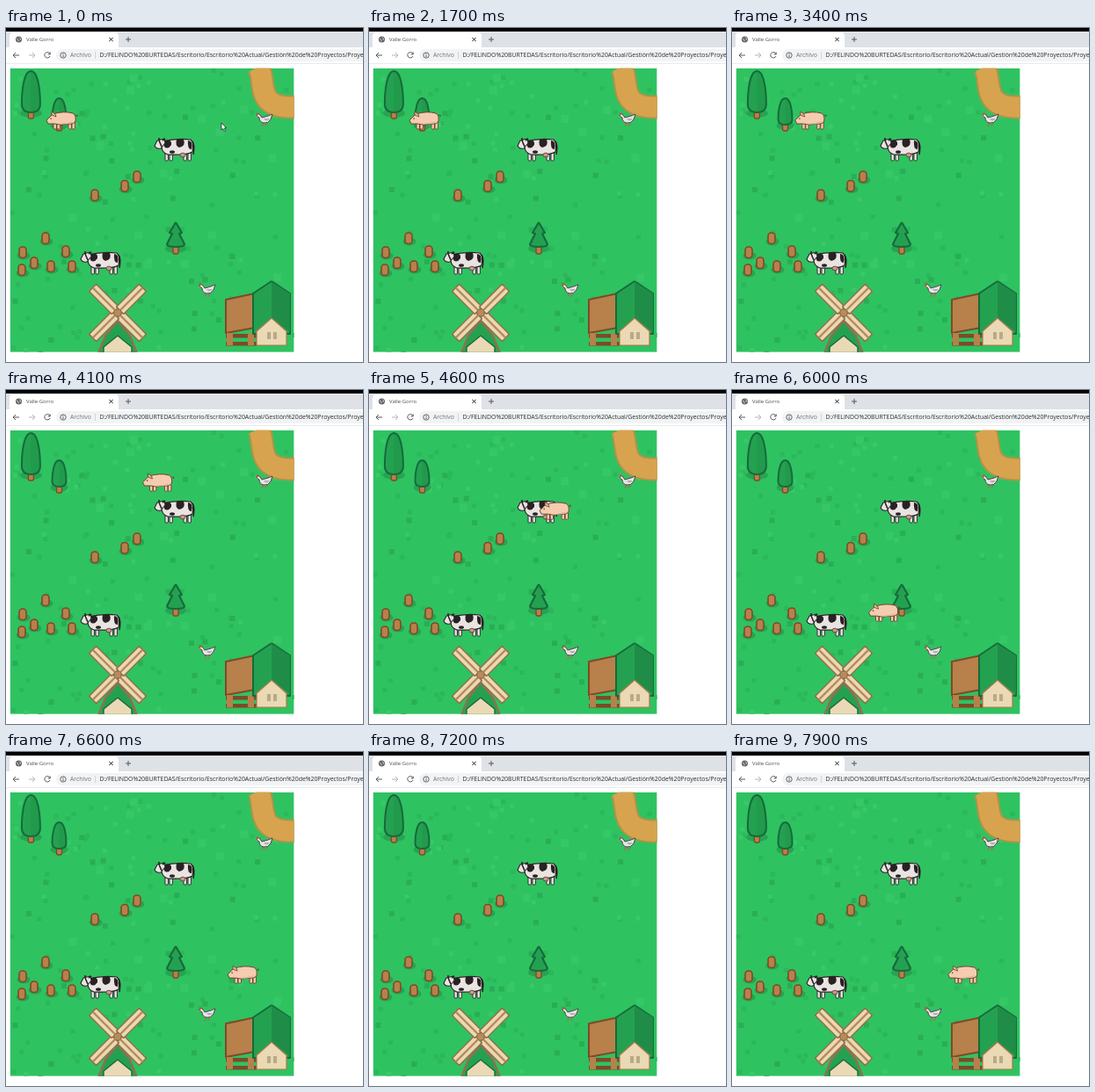
Animation of 406 by 380 pixels, one loop 8000 ms. Source, as an HTML page with a canvas:

```html
<!DOCTYPE html>
<html lang="es">
<head>
<meta charset="utf-8">
<title>Valle Gorro</title>
<style>
html, body { margin: 0; width: 100%; height: 100%; overflow: hidden; background: #fff; }
canvas { display: block; width: 406px; height: 380px; }
</style>
</head>
<body>
<canvas id="stage" width="406" height="380"></canvas>
<script>
const ctx = document.getElementById('stage').getContext('2d');
const LOOP = 8000, TICK = 100, STEP = 6.44;
const MAP = { x: 4.6, y: 45.8, size: 323 };
const LEAF = '#24a150', LEAF_DARK = '#166b3b', SHADE = '#27a452';
const WOOD = '#b8804a', WOOD_DARK = '#7d4a28', CREAM = '#ead9b4', INK = '#292124';
const GRAY = '#55595e', PALE = '#b2b5b8';

// Waypoints: time, x, y
const pigRoute = [
  [3200, 64, 105], [4100, 173, 105], [4400, 212, 105], [5100, 212, 208], [5300, 212, 254],
  [5500, 112, 254], [5600, 112, 254], [7100, 350, 254], [7400, 346, 254], [7900, 263, 254]
];
const pointerRoute = [[0, 245, 108], [900, 178, 88], [1700, 148, 78]];

function along(route, t) {
  const next = route.findIndex(p => p[0] >= t);
  if (next < 1) return route.at(next).slice(1);
  const [t0, x0, y0] = route[next - 1], [t1, x1, y1] = route[next];
  const k = (t - t0) / (t1 - t0);
  return [x0 + (x1 - x0) * k, y0 + (y1 - y0) * k];
}

function paint(path, fill, stroke, width = 1) {
  if (fill) { ctx.fillStyle = fill; ctx.fill(path); }
  if (stroke) { ctx.strokeStyle = stroke; ctx.lineWidth = width; ctx.stroke(path); }
}

const shape = (d, ...style) => paint(new Path2D(d), ...style);
const line = (d, color, width) => shape(d, null, color, width);

// Joins the right half of an outline with its mirror image.
function mirrored(d, ...style) {
  const half = new Path2D(d), whole = new Path2D(d);
  whole.addPath(half, new DOMMatrix([-1, 0, 0, 1, 0, 0]));
  paint(whole, ...style);
}

function oval(x, y, rx, ry, ...style) {
  const p = new Path2D();
  p.ellipse(x, y, rx, ry, 0, 0, 7);
  paint(p, ...style);
}

function pill(x, y, w, h, r, ...style) {
  const p = new Path2D();
  p.roundRect(x, y, w, h, r);
  paint(p, ...style);
}

function box(x, y, w, h, color) {
  ctx.fillStyle = color;
  ctx.fillRect(x, y, w, h);
}

function text(s, x, y, size, color) {
  ctx.font = `${size}px "Open Sans", "Noto Sans", sans-serif`;
  ctx.fillStyle = color;
  ctx.fillText(s, x, y);
}

function at(x, y, draw, angle = 0) {
  ctx.save();
  ctx.translate(x, y);
  ctx.rotate(angle);
  draw();
  ctx.restore();
}

function random(seed) {
  return () => (seed = (seed * 16807) % 2147483647) / 2147483647;
}

const arrow = color => line('M4 0H-3M0 -3L-3 0L0 3', color);
const plus = () => line('M-3 0H3M0 -3V3', GRAY);

function browser() {
  box(0, 0, 406, 380, '#fff');
  box(0, 0, 406, 22, '#dee1e6');
  box(0, 0, 406, 4, '#000');
  pill(4, 5, 124, 17, [4, 4, 0, 0], '#fff');
  pill(57, 24, 360, 14, 7, '#f1f3f4');
  box(0, 40, 406, 0.6, '#dcdee1');

  at(14.5, 13, () => {
    oval(0, 0, 3.5, 3.5, '#5f6368');
    line('M-2.5 -1L-0.5 0.5V2.5M0.5 -2.5L2 -1L1.5 1', '#e8eaed', 0.8);
  });
  text('Valle Gorro', 23, 15.2, 6, '#45494d');
  at(119.5, 13, plus, Math.PI / 4);
  at(139, 13, plus);

  at(11, 31, () => arrow(GRAY));
  at(30, 31, () => arrow(PALE), Math.PI);
  at(47, 31, () => line('M3 -1.5A3.2 3.2 0 1 0 3 1M3.2 -3.5V-1H0.8', GRAY));
  at(65, 31, () => {
    oval(0, 0, 3.2, 3.2, null, GRAY, 0.9);
    line('M0 -2V-1M0 -0.3V2', GRAY);
  });
  text('Archivo', 73, 33.4, 6.9, '#707479');
  box(101, 27, 0.7, 8, '#c4c7ca');
  text('D:/FELINDO%20BURTEDAS/Escritorio/Escritorio%20Actual/Gestión%20de%20Proyectos/Proyecto',
    106.5, 33.4, 6.92, '#2b2e31');
}

function grass() {
  const { x, y, size } = MAP, rnd = random(4173);
  box(x, y, size, size, '#2fc261');
  const scatter = (count, side, color) => {
    while (count--) box(x + rnd() * size, y + rnd() * size, side, side, color);
  };
  scatter(80, 5, '#2bb75a');
  scatter(30, 6, '#29ae55');
  scatter(35, 5, '#38c969');
  scatter(14, 9, '#36c867');
}

function road() {
  const d = 'M287 44C297 62 281 92 330 90';
  line(d, '#ad9447', 27);
  line(d, '#d7a34f', 23);
}

function trunk(y) {
  pill(-3, y - 6, 6, 9, 2, WOOD, WOOD_DARK, 1.4);
}

function tree(r, h) {
  oval(0, h + 1, r + 2, 5, SHADE);
  trunk(h + 4);
  const side = `M0 0C${r * 0.8} 0 ${r} ${h * 0.5} ${r} ${h * 0.8}Q${r} ${h} 0 ${h}`;
  mirrored(side, LEAF, LEAF_DARK, 2);
  shape(side, 'rgba(18,115,58,.15)');
}

function pine() {
  oval(0, 31, 12, 5, SHADE);
  trunk(34);
  mirrored('M0 1L7 13L4 14L10 26Q10 29 0 29', LEAF, LEAF_DARK, 2.2);
}

function stump(x, y) {
  oval(x + 1, y + 4, 7.5, 4.5, SHADE);
  pill(x - 4, y - 6, 8, 12.5, 3.5, WOOD, WOOD_DARK, 1.6);
}

function stumps() {
  for (let i = 0; i < 3; i++) stump(149 - 4 * i - 10 * i * i, 169 + 10.5 * i);
  for (const [x, y] of [[45, 239], [68, 254], [19, 255], [32, 267], [51, 271], [75, 271], [18, 275]]) {
    stump(x, y);
  }
}

function sail() {
  pill(3, -6.5, 38, 13, 1, '#8f714f');
  pill(4.5, -5, 35, 10, 1, CREAM);
  box(0, -1.2, 40, 2.4, '#b98b58');
}

function mill() {
  mirrored('M0 9L14 26L22 46H0', LEAF, '#8f714f', 2.4);
  mirrored('M0 26L16 39V46H0', CREAM, LEAF_DARK, 1.4);
  for (let i = 0; i < 4; i++) at(0, 0, sail, Math.PI * (i + 0.5) / 2);
  pill(-4, -4, 8, 8, 3, '#b98b58', '#8f714f');
}

function barn() {
  shape('M-52 21L-19 14V53L-52 59Z', WOOD, WOOD_DARK, 2);
  for (const y of [60, 69]) box(-52, y, 35, 4.5, WOOD_DARK);
  for (const x of [-51, -27]) box(x, 59, 7, 14, WOOD);
  mirrored('M0 0L21 14V60H0', LEAF, LEAF_DARK, 2);
  box(0, 3, 3, 40, '#1f8d47');
  shape('M0 1L21 14V58L0 42Z', '#1f8d47');
  mirrored('M0 42L17 57V73H0', CREAM, '#a9794a', 1.2);
  for (const x of [-5, 2]) box(x, 58, 4, 8, '#b7aa87');
}

function legs(xs, y, len, color, edge) {
  for (const x of xs) pill(x, y, 3.4, len, 1, color, edge, 0.9);
}

// Animals are drawn around their centre, facing left.
function cow() {
  const hide = '#e9e3e2';
  legs([-11, -6, 10, 15], 3, 10, hide, INK);
  line('M20 -9Q23 -5 21 6', INK, 1.5);
  shape('M-14 -9Q2 -13 18 -11Q22 -8 20 3Q14 7 -8 6Q-14 4 -15 -2Z', hide, INK, 1.2);
  shape('M-12 -10Q-3 -12 -4 -5Q-8 1 -12 -3ZM2 -11H10Q13 -4 5 -2Q0 -4 2 -11ZM15 -10Q21 -10 19 0Q14 0 15 -10Z', INK);
  oval(-3, 3, 3, 1.8, INK);
  oval(9, 6.5, 3, 2.4, '#cf9482', INK, 0.6);
  shape('M-12 -12L-20 -10L-23 -4Q-21 0 -16 -1L-11 -7Z', hide, INK, 1.1);
  line('M-18 -10L-15 -3M-18 -10V-13M-14 -10L-11 -12', INK, 1.6);
}

function hen() {
  line('M-1 3V7H-3M3 3V7H1', '#a7703e');
  shape('M-8 -4Q-7 -8 -4 -5L-2 -2L5 -4L10 -6L8 0Q5 5 0 4Q-5 3 -5 -2Z', '#e8e3e5', '#51474b');
  shape('M0 -1L7 -1Q3 4 0 -1Z', '#b5aeb3');
  oval(-6.5, -6.5, 1.6, 1.1, '#d64534');
  shape('M-8 -4L-10 -3H-7Z', '#dd9638');
}

function pig() {
  const skin = '#f5ccaf', edge = '#684331';
  legs([-10, -6, 7, 11], 1, 9, skin, edge);
  shape('M-11 -7Q2 -11 12 -8Q16 -6 15 1Q13 5 6 4Q-2 6 -9 4H-16L-18 0L-14 -4Z', skin, edge);
  shape('M-6 4Q3 4 13 1Q8 6 -6 4Z', '#e4b497');
  shape('M-12 -6V-10L-8 -7L-7 -4Z', '#e9b79a', edge, 0.8);
  box(-13.5, -2.5, 1.2, 1.2, INK);
  line('M15 -5Q18 -8 17 -4', edge);
}

function pointer() {
  shape('M0 0V8L1.8 6.4L3.2 9.4L4.6 8.8L3.3 5.8H5.8Z', '#fff', '#222', 0.8);
}

function scenery() {
  grass();
  road();
  at(28.4, 49, () => tree(10.5, 47));
  at(60.5, 80, () => tree(8, 30));
  at(193, 220, pine);
  stumps();
  at(127, 324, mill);
  at(302, 288, barn);
  at(192, 138, cow);
  at(108, 267, cow);
  at(293, 104, hen);
  at(228, 298, hen);
}

function render(t) {
  browser();
  ctx.save();
  ctx.beginPath();
  ctx.rect(MAP.x, MAP.y, MAP.size, MAP.size);
  ctx.clip();
  scenery();
  const [x, y] = along(pigRoute, t);
  const snap = (v, base) => base + Math.round((v - base) / STEP) * STEP;
  at(snap(x, 64), snap(y, 105), pig);
  ctx.restore();
  if (t < 1700) at(...along(pointerRoute, t), pointer);
}

const start = performance.now();
function loop() {
  const t = (performance.now() - start) % LOOP;
  render(Math.floor(t / TICK) * TICK);
  requestAnimationFrame(loop);
}
ctx.lineJoin = 'round';
loop();
</script>
</body>
</html>
```
